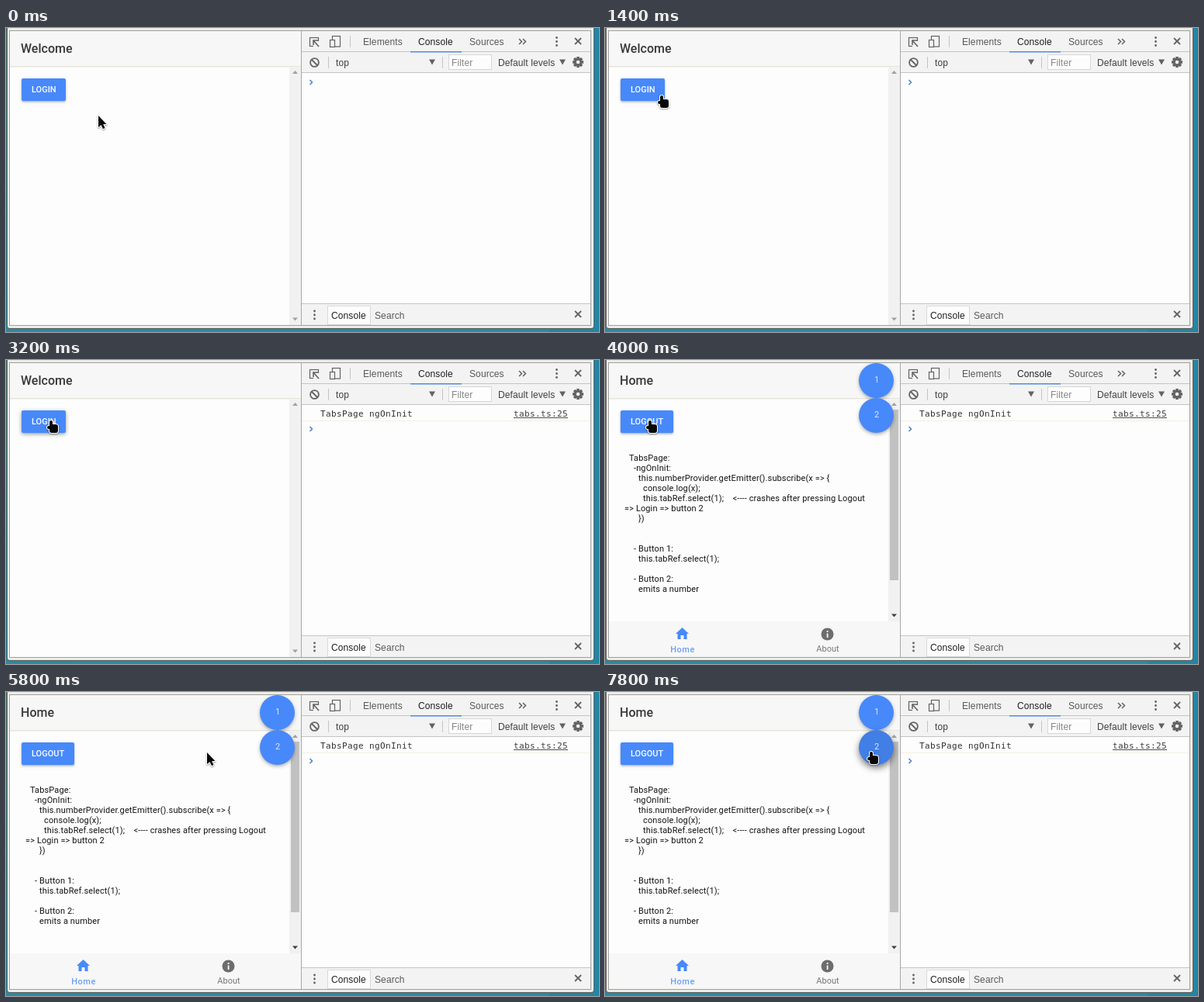
Animation, 764 px wide and 392 px high, one loop 8000 ms. Source, as an HTML page with a canvas:

```html
<!DOCTYPE html>
<html lang="en">
<head>
<meta charset="utf-8">
<title>Tabs demo</title>
<style>
  html, body { margin: 0; width: 100%; height: 100%; overflow: hidden; background: #2488a6; }
  canvas { display: block; width: 764px; height: 392px; }
</style>
</head>
<body>
<canvas id="stage" width="764" height="392"></canvas>
<script>
const ctx = document.getElementById('stage').getContext('2d');
const LOOP = 8000, STEP = 200;
const BLUE = '#4789fa', BLUE_DOWN = '#417ee6';
const BAR = '#f3f3f3', HEADER = '#f7f7f7', PAPER = '#fdfdfd';
const INK = '#202020', MUTED = '#585858', ICON = '#636363', LINE = '#c4c4c4';
const SANS = '12px "Liberation Sans", Arial, sans-serif';
const MONO = '11px "DejaVu Sans Mono", monospace';
const roboto = (size, weight = 400) => `${weight} ${size}px Roboto, sans-serif`;

function rect(x, y, w, h, color) {
  ctx.fillStyle = color;
  ctx.fillRect(x, y, w, h);
}

function box(x, y, w, h, border, fill) {
  rect(x, y, w, h, border);
  rect(x + 1, y + 1, w - 2, h - 2, fill);
}

function round(x, y, w, h, r, color) {
  ctx.beginPath();
  ctx.roundRect(x, y, w, h, r);
  ctx.fillStyle = color;
  ctx.fill();
}

function outline(x, y, w, h) {
  ctx.strokeStyle = ICON;
  ctx.lineWidth = 1.2;
  ctx.strokeRect(x, y, w, h);
}

function disc(x, y, r, color) {
  round(x - r, y - r, 2 * r, 2 * r, r, color);
}

function line(color, width, ...points) {
  ctx.beginPath();
  for (const [x, y] of points) ctx.lineTo(x, y);
  ctx.strokeStyle = color;
  ctx.lineWidth = width;
  ctx.stroke();
}

// A negative height points the triangle up.
function triangle(x, y, w, h, color) {
  ctx.beginPath();
  ctx.moveTo(x - w / 2, y - h / 2);
  ctx.lineTo(x + w / 2, y - h / 2);
  ctx.lineTo(x, y + h / 2);
  ctx.fillStyle = color;
  ctx.fill();
}

function text(s, x, y, font, color = INK, spacing = 0, align = 'left') {
  ctx.font = font;
  ctx.fillStyle = color;
  ctx.textAlign = align;
  ctx.letterSpacing = spacing + 'px';
  ctx.fillText(s, x, y);
}

const label = (s, x, y, color) => text(s, x, y, SANS, color, 0.1);

function withShadow(blur, dy, alpha, paint) {
  ctx.save();
  ctx.shadowColor = `rgba(0,0,0,${alpha})`;
  ctx.shadowBlur = blur;
  ctx.shadowOffsetY = dy;
  paint();
  ctx.restore();
}

function cross(x, y) {
  for (const s of [-4, 4]) line(ICON, 1.8, [x - s, y - 4], [x + s, y + 4]);
}

function dots(x, y) {
  for (let i = -1; i <= 1; i++) disc(x, y + i * 5, 1.4, ICON);
}

function chevron(x, y, color, size) {
  line(color, 1.5, [x, y - size], [x + size, y], [x, y + size]);
}

function gear(x, y) {
  ctx.save();
  ctx.translate(x, y);
  for (let i = 0; i < 4; i++) {
    rect(-1.8, -7, 3.6, 14, ICON);
    ctx.rotate(Math.PI / 4);
  }
  disc(0, 0, 5.2, ICON);
  disc(0, 0, 2.3, BAR);
  ctx.restore();
}

function drawWindow() {
  const desk = ctx.createLinearGradient(0, 0, 90, 392);
  desk.addColorStop(0, '#557a70');
  desk.addColorStop(1, '#2b8aa4');
  rect(0, 0, 764, 392, desk);
  rect(700, 0, 64, 392, '#2385a5');
  round(1, -8, 757, 396, 4, '#5c5c58');
  round(2, -8, 755, 395, 3, '#ecece8');
  box(4, 3, 750, 381, '#a0a09c', PAPER);
}

function drawTools() {
  rect(381, 4, 372, 54, BAR);
  rect(381, 58, 372, 297, PAPER);
  rect(381, 356, 372, 27, BAR);
  for (const y of [30, 57, 355]) rect(381, y, 372, 1, LINE);
  rect(380, 4, 1, 379, '#a8a8a8');
  rect(521, 30, 66, 1.5, '#4d8be0');

  outline(391.5, 12.5, 11, 11);
  rect(396, 17, 9, 8, BAR);
  line(ICON, 1.6, [396, 22], [396, 16], [402, 16]);
  line(ICON, 1.6, [396, 16], [403, 24]);
  outline(420.5, 10.5, 10, 13.5);
  rect(417, 15, 7, 10, BAR);
  outline(417.5, 15.5, 6, 9);
  label('Elements', 460, 22, MUTED);
  label('Console', 531, 22);
  label('Sources', 597, 22, MUTED);
  for (const x of [661, 666]) chevron(x, 17.5, ICON, 3.5);
  dots(709.5, 17.5);
  cross(737, 17);

  disc(397.5, 44.5, 6.3, ICON);
  disc(397.5, 44.5, 4.5, BAR);
  line(ICON, 1.8, [393.5, 40.5], [401.5, 48.5]);
  label('top', 425, 49, '#404040');
  box(570, 34, 56, 20, '#d6d6d6', PAPER);
  label('Filter', 574, 49, '#858585');
  label('Default levels', 634, 49, '#404040');
  for (const x of [549, 717]) triangle(x, 44, 8, 7, ICON);
  gear(737, 44);
  rect(443, 10, 1, 15, LINE);
  for (const x of [415, 562]) rect(x, 37, 1, 15, LINE);

  dots(397.5, 370);
  box(414, 358, 56, 25, '#d8d8d8', PAPER);
  label('Console', 419, 375);
  label('Search', 475, 375, MUTED);
  cross(737, 369);
}

function drawLog(shown) {
  if (shown) {
    text('TabsPage ngOnInit', 405, 73, MONO, '#303030', 0.378);
    text('tabs.ts:25', 654, 73, MONO, '#404040', 0.378);
    rect(654, 74, 70, 1, '#505050');
    rect(381, 78, 372, 1, '#f1f1e4');
  }
  chevron(391.5, shown ? 89 : 70, '#4a7fc8', 3);
}

function drawPage(title, action, width, pressed, bottom, scrollable) {
  rect(5, 50, 375, 333, PAPER);
  rect(5, 4, 375, 45, HEADER);
  rect(5, 49, 375, 1, '#e4e4dc');
  rect(5, 50, 375, 1, '#f3f3ec');
  text(title, 19, 32, roboto(16, 500), '#383838');

  rect(365, 51, 15, bottom - 51, '#f1f1f1');
  if (scrollable) rect(367, 64, 11, 220, '#c1c1c1');
  triangle(372.5, 57, 7, -4, '#a0a0a0');
  triangle(372.5, bottom - 7.5, 7, 4, scrollable ? '#404040' : '#a0a0a0');

  withShadow(pressed ? 5 : 3, 1.5, pressed ? 0.4 : 0.3, () => round(20, 65, width, 29, 2, BLUE));
  text(action, 33, 83, roboto(11, 500), '#fafcff');
}

const NOTES = `  TabsPage:
    -ngOnInit:
      this.numberProvider.getEmitter().subscribe(x => {
        console.log(x);
        this.tabRef.select(1);    <---- crashes after pressing Logout
=> Login => button 2
      })


    - Button 1:
      this.tabRef.select(1);

    - Button 2:
      emits a number`.split('\n');

function drawNotes() {
  NOTES.forEach((row, i) => {
    const indent = row.search(/\S|$/);
    text(row.trim(), 25 + indent * 3, 130 + i * 13, roboto(11), '#141414', 0.12);
  });
}

function drawTabBar() {
  rect(5, 337, 375, 46, HEADER);
  triangle(99.5, 349, 17, -8, BLUE);
  rect(93.5, 352, 12, 8, BLUE);
  rect(97.5, 355, 4, 5, HEADER);
  text('Home', 100, 376.5, roboto(11, 500), '#6c9ff5', 0.5, 'center');
  disc(286.5, 353.5, 8, '#6d6d6d');
  rect(285.7, 349, 1.8, 2, HEADER);
  rect(285.7, 352.5, 1.8, 5.5, HEADER);
  text('About', 287, 376, roboto(11), '#777777', 0, 'center');
}

function fab(name, y, pressed) {
  withShadow(pressed ? 8 : 4, pressed ? 4 : 2, pressed ? 0.5 : 0.3, () =>
    disc(349.5, y, 22.5, pressed ? BLUE_DOWN : BLUE));
  text(name, 350, y + 2.5, roboto(11), '#dce9ff', 0, 'center');
}

function drawHome(pressed) {
  drawPage('Home', 'LOGOUT', 68, false, 337, true);
  drawNotes();
  drawTabBar();
  fab('1', 26.5, false);
  fab('2', 71.5, pressed);
}

// The pointer rests at each stop between its moves.
const MOVES = [
  { from: 400, to: 1880, dx: -61, dy: -35 },
  { from: 4360, to: 6400, dx: 254, dy: 0 },
  { from: 6800, to: 7400, dx: 31, dy: -1 }
];

function progress(t, from, to) {
  return Math.min(1, Math.max(0, (t - from) / (to - from)));
}

function pointerAt(t) {
  let x = 119, y = 113;
  for (const { from, to, dx, dy } of MOVES) {
    const k = progress(t, from, to), eased = k * k * (3 - 2 * k);
    x += dx * eased;
    y += dy * eased;
  }
  return [Math.round(x), Math.round(y)];
}

const arrow = new Path2D('M0 0V15L3.5 12L6 17L8.5 16L6.2 11H10.5Z');
const hand = new Path2D();
hand.roundRect(-2, 0, 4, 12, 2);
hand.roundRect(-2, 5, 11, 11, 3);
hand.roundRect(-5, 7, 6, 4, 2);

function drawPointer(x, y, homeShown) {
  const onButton = x >= 20 && x < (homeShown ? 88 : 77) && y >= 65 && y < 94;
  const onFab = homeShown && Math.hypot(x - 349.5, y - 71.5) < 22.5;
  const shape = onButton || onFab ? hand : arrow;
  ctx.save();
  ctx.translate(x, y);
  ctx.lineJoin = 'round';
  ctx.lineWidth = 2;
  ctx.strokeStyle = '#ffffff';
  withShadow(2, 1, 0.4, () => ctx.stroke(shape));
  ctx.fillStyle = '#080808';
  ctx.fill(shape);
  ctx.restore();
}

function draw(now) {
  const t = Math.floor(now % LOOP / STEP) * STEP;
  const enter = progress(t, 3200, 3600);
  const ease = 1 - (1 - enter) ** 2;
  drawWindow();
  ctx.save();
  ctx.beginPath();
  ctx.rect(5, 4, 375, 379);
  ctx.clip();
  if (enter < 1) drawPage('Welcome', 'LOGIN', 57, t >= 2800, 383, false);
  if (enter > 0) {
    ctx.globalAlpha = ease;
    ctx.translate(0, 40 * (1 - ease));
    drawHome(t >= 7600);
  }
  ctx.restore();
  drawTools();
  drawLog(t >= 3000);
  drawPointer(...pointerAt(t), enter === 1);
}

const start = performance.now();
function tick() {
  draw(performance.now() - start);
  requestAnimationFrame(tick);
}
tick();
</script>
</body>
</html>
```
